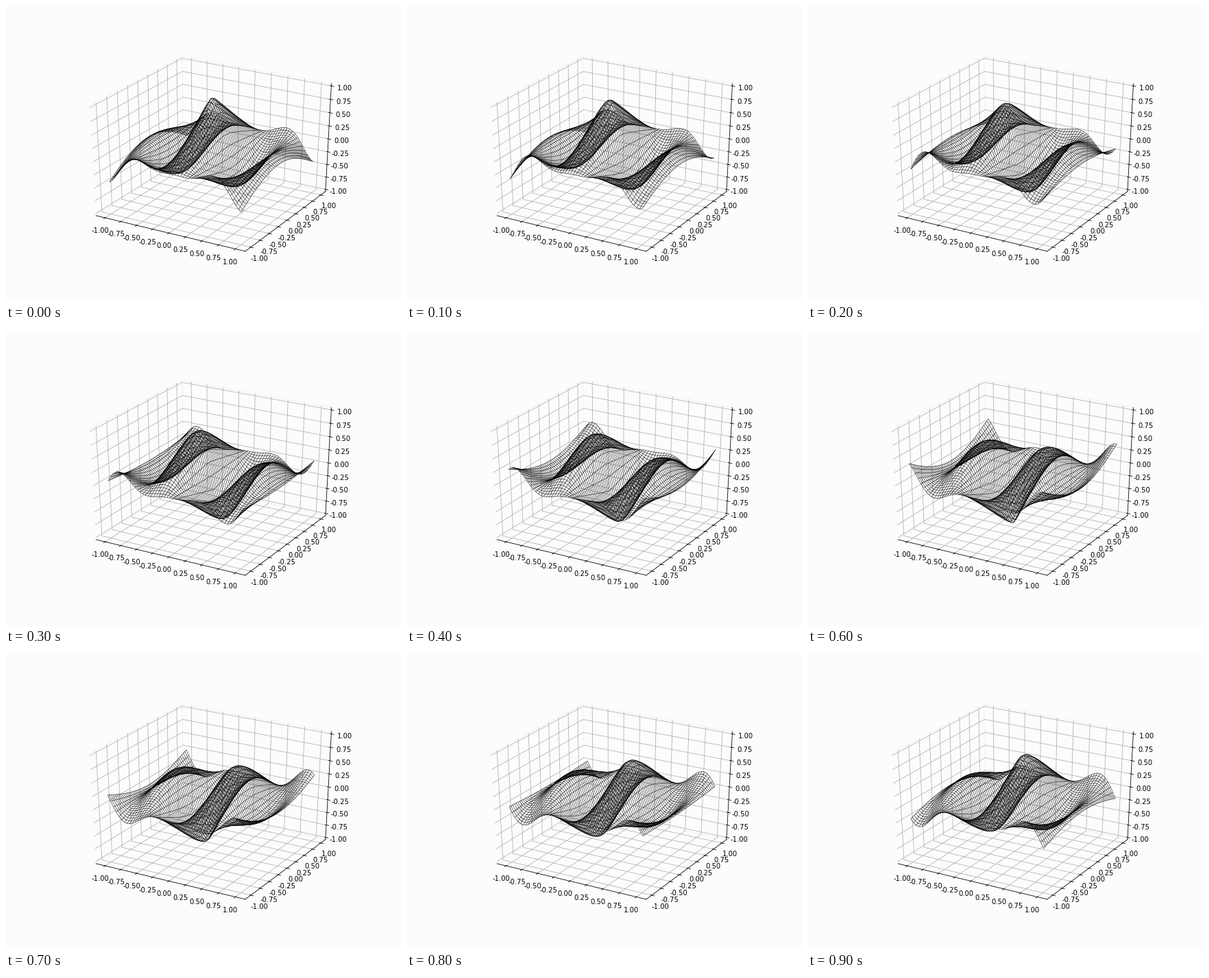
Animation of 576x432 px, one loop 1 s. Source, as a matplotlib script:

```python
import numpy as np
import matplotlib.pyplot as plt
from matplotlib.animation import FuncAnimation
from mpl_toolkits.mplot3d import Axes3D
from mpl_toolkits.mplot3d.art3d import Line3DCollection

FRAMES, INTERVAL = 10, 100
PHASE_STEP = 180 / np.pi / 99
PAPER = "#fcfcfc"

plt.rcParams.update({"axes.unicode_minus": False, "font.family": "DejaVu Sans",
                     "font.size": 10})


class StretchedAxes3D(Axes3D):
    """3D axes that fill their rectangle instead of shrinking to a square."""

    def apply_aspect(self, position=None):
        pass


X, Y = np.meshgrid(np.linspace(-1, 1, 50), np.linspace(-1, 1, 50))
CONE = 1 - np.hypot(X, Y)


def wires(frame):
    """Grid lines of the travelling wave, along x and then along y."""
    Z = CONE * np.cos(2 * np.pi * X + frame * PHASE_STEP)
    points = np.dstack([X, Y, Z])
    return [*points, *points.swapaxes(0, 1)]


fig = plt.figure(figsize=(8, 6), dpi=72, facecolor=PAPER)
ax = StretchedAxes3D(fig, [0.125, 0.125, 0.775, 0.755])
fig.add_axes(ax)
ax.patch.set_visible(False)
ax.view_init(elev=30, azim=-60)

# The zoom cancels the built-in scaling, leaving a unit cube plus its padding.
ax.set_box_aspect((1, 1, 1), zoom=np.sqrt(3) / 1.8294640721620434)
padding = 25 / 24
ax.set_xlim(-1.1 * padding, 1.1 * padding)
ax.set_ylim(-1.1 * padding, 1.1 * padding)
ax.set_zlim(-padding, padding)

for axis in (ax.xaxis, ax.yaxis, ax.zaxis):
    axis.set_ticks(np.linspace(-1, 1, 9))
    axis.set_pane_color("#f3f3f3")
    axis.pane.set_facecolor("none")

mesh = Line3DCollection(wires(0), colors="black", linewidths=0.5)
ax.add_collection3d(mesh)


def update(frame):
    mesh.set_segments(wires(frame))
    return [mesh]


anim = FuncAnimation(fig, update, frames=FRAMES, interval=INTERVAL,
                     repeat=True, repeat_delay=0, blit=False)
plt.show()
```
